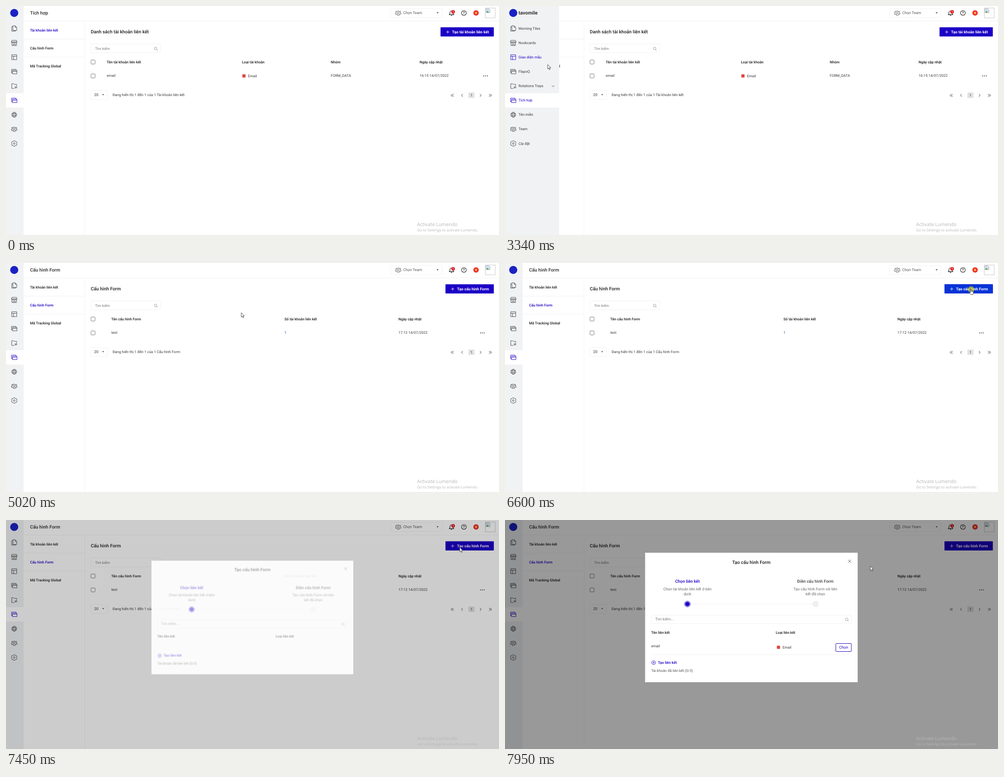
An HTML page for the animation above (8000 ms loop, 1096 by 511 pixels).

```html
<!DOCTYPE html>
<html lang="vi">
<head>
<meta charset="utf-8">
<title>Tích hợp</title>
<style>
html, body { margin: 0; width: 100%; height: 100%; overflow: hidden; background: #fff; }
svg { display: block; width: 100vw; height: 100vh; font-family: Roboto, "Open Sans", sans-serif; text-rendering: geometricPrecision; }
.mark { font-family: "Open Sans", "Noto Sans", sans-serif; }
</style>
</head>
<body>
<svg id="stage" viewBox="0 0 1096 511"></svg>
<script>
const LOOP = 8000, BLUE = '#1b00c5', DARK = '#1c1c1c', INK = '#3a3a3a', EDGE = '#f1f1f1';
const stage = document.getElementById('stage');

// ---- drawing helpers ----
const text = (x, y, str, fill = INK, weight = 400, size = 8, anchor = 'start') =>
  `<text x="${x}" y="${y + size * .34}" font-size="${size}" font-weight="${weight}" fill="${fill}" text-anchor="${anchor}">${str}</text>`;
const mid = (x, y, str, fill, weight, size) => text(x, y, str, fill, weight, size, 'middle');
const bold = (x, y, str, fill = DARK, size = 8) => text(x, y, str, fill, 500, size);
const rect = (x, y, w, h, fill, extra = '') => `<rect x="${x}" y="${y}" width="${w}" height="${h}" fill="${fill}" ${extra}/>`;
const frame = (x, y, w, h, color = EDGE, r = 1) => rect(x, y, w, h, 'none', `stroke="${color}" rx="${r}"`);
const circle = (x, y, r, fill, extra = '') => `<circle cx="${x}" cy="${y}" r="${r}" fill="${fill}" ${extra}/>`;
const line = (d, color = INK, w = 1) => `<path d="${d}" fill="none" stroke="${color}" stroke-width="${w}"/>`;
const at = (x, y, body, extra = '') => `<g transform="translate(${x} ${y}) ${extra}">${body}</g>`;
const fade = (alpha, body) => alpha > 0 ? `<g opacity="${alpha}">${body}</g>` : '';
const arrowDown = (x, y) => `<path d="M${x - 2.2},${y - 1.2}h4.4l-2.2,2.8z" fill="#555"/>`;
const lens = (x, y) => line(`M${x + 2.6},${y - .7}a3,3 0 1 0 -6,0a3,3 0 1 0 6,0M${x + 1.8},${y + 1.5}l2.4,2.5`, '#888', .8);
const dots = (x, y) => [-4, 0, 4].map(d => circle(x + d, y, 1, '#222')).join('');
const mail = (x, y) => rect(x - 3.5, y - 3.5, 7, 7, '#e0443a');

// ---- motion helpers ----
const ramp = (t, a, b) => Math.min(1, Math.max(0, (t - a) / (b - a)));
const ease = p => p * p * (3 - 2 * p);
const PATH = [
  [300, 1019, 495], [440, 860, 445], [650, 642, 371], [1379, 642, 371], [1380, 730, 405], [1590, 1074, 500],
  [2120, 907, 476], [2400, 500, 320], [2650, 140, 185], [2790, 20, 150], [2860, 40, 148],
  [3070, 95, 140], [3270, 95, 140], [3340, 95, 131], [3490, 96, 82], [3880, 103, 209], [4030, 103, 209],
  [4250, 126, 190], [4450, 141, 150], [4810, 100, 96], [4880, 100, 96], [5020, 522, 111],
  [5300, 800, 92], [5670, 1036, 58], [7300, 1036, 58], [7450, 1009, 61], [7950, 812, 103]
];
function cursorAt(t) {
  if (t < 300 || (t >= 1590 && t < 2120)) return null;
  const i = PATH.findIndex(k => k[0] > t);
  if (i < 0) return PATH[PATH.length - 1].slice(1);
  const [t0, x0, y0] = PATH[i - 1], [t1, x1, y1] = PATH[i], p = (t - t0) / (t1 - t0);
  return [x0 + (x1 - x0) * p, y0 + (y1 - y0) * p];
}

// ---- sidebar ----
const STACK = 'M-4,-2.5H6V5H-4ZM-4,-.3H6M-4,3H-6V-5H4V-2.5';
const TEAM = 'M-2,-2.8a2,2 0 1 0 4,0a2,2 0 1 0 -4,0M-2.6,5V1.5H2.6V5ZM-5.5,-3a1.1,1.1 0 1 0 2.2,0a1.1,1.1 0 1 0 -2.2,0' +
  'M3.3,-3a1.1,1.1 0 1 0 2.2,0a1.1,1.1 0 1 0 -2.2,0M-3.5,-.3H-6V3H-4M3.5,-.3H6V3H4';
const MENU = [
  ['Morning Tiles', 'M-3,-6H2L5.5,-2.5V4.5H-3ZM2,-6V-2.5H5.5M-3,-4H-5.5V6H3V4.5'],
  ['Nookcards', 'M-5,-5.5H5L6.3,-2H-6.3ZM-6.3,-2a2.1,2.1 0 0 0 4.2,0a2.1,2.1 0 0 0 4.2,0a2.1,2.1 0 0 0 4.2,0M-5,0V6H5V0M-2,6V2.5H2V6'],
  ['Giao diện mẫu', 'M-5.5,-5.5H5.5V5.5H-5.5ZM-5.5,-2H5.5M-1.5,-2V5.5'],
  ['FlapoQ', STACK],
  ['Rotations Trays', 'M5.5,-.5V-3.5H0L-1.5,-5H-5.5V5.5H0M1,2H6L4.5,.5M6.5,4H1.5L3,5.5'],
  ['Tích hợp', STACK],
  ['Tên miền', 'M-5.5,0a5.5,5.5 0 1 0 11,0a5.5,5.5 0 1 0 -11,0M-2.5,0a2.5,5.5 0 1 0 5,0a2.5,5.5 0 1 0 -5,0M-5,-2H5M-5,2H5'],
  ['Team', TEAM],
  ['Cài đặt', 'M-2,-5.8H2L3,-4.2H5L6,-1.5L5,0L6,1.5L5,4.2H3L2,5.8H-2L-3,4.2H-5L-6,1.5L-5,0L-6,-1.5L-5,-4.2H-3ZM-1.8,0a1.8,1.8 0 1 0 3.6,0a1.8,1.8 0 1 0 -3.6,0']
];
const ROW = 32.1, TOP = 34;

function sidebar(t, cur) {
  const open = ease(ramp(t, 2720, 2900)) - ease(ramp(t, 4260, 4420));
  const width = 39.5 + 81 * open;
  const hover = cur && open > 0 && cur[0] < width ? Math.floor((cur[1] - 3 - TOP) / ROW) : -1;
  const items = MENU.map(([label, icon], i) => {
    const y = TOP + ROW * (i + .5), color = i === 5 || i === hover ? BLUE : INK;
    return at(18.3, y, line(icon, color, .9)) +
      (open > 0 ? text(30, y, label, color) : '') +
      (open > 0 && i === 4 ? line(`M104,${y - 1}l3,2.6l3,-2.6`, color, .8) : '');
  }).join('');
  return `<clipPath id="side"><rect width="${width}" height="511"/></clipPath><g clip-path="url(#side)">` +
    rect(0, 0, width, 511, '#f1f2f4') + rect(0, TOP + 5 * ROW, width, ROW, '#fff') +
    circle(18.3, 15.5, 9, '#1a22c4') + (open > 0 ? text(30, 15.5, 'tavomile', '#333', 700, 11) : '') + items + '</g>';
}

// ---- page ----
const STAR = Array.from({ length: 10 }, (_, i) => {
  const r = i % 2 ? 1.4 : 3.4, a = i * Math.PI / 5;
  return [(r * Math.sin(a)).toFixed(2), (-r * Math.cos(a)).toFixed(2)];
}).join(' ');

const header = title =>
  bold(53.5, 15.5, title, '#2a2a2a', 10.28) + line('M40,33.5H1096', EDGE) +
  frame(855.5, 5.5, 114, 20) + at(872, 15.5, line(TEAM, '#555', .9)) + text(883, 15.3, 'Chọn Team', '#555', 400, 8.3) + arrowDown(959.5, 15.3) +
  at(990.5, 16, line('M-5,3.3H5L3.6,1.4V-1.2A3.6,3.8 0 0 0 -3.6,-1.2V1.4ZM-1.5,4.8H1.5', '#222', 1.2)) +
  circle(994, 13, 4, '#e3242b') + mid(994, 13, '1', '#fff', 500, 5.5) +
  circle(1018, 15.5, 5.3, 'none', 'stroke="#222" stroke-width="1.1"') + mid(1018, 15.5, '?', '#222', 700, 8) +
  circle(1045, 15.5, 6, '#f0302f') + at(1045, 15.5, `<polygon points="${STAR}" fill="#ffd84a"/>`) +
  frame(1065.5, 4.5, 22, 22, '#c8c8c8', 0) +
  at(1066.5, 5.5, '<path d="M.5,.5H7L9.5,3V9.5H.5Z" fill="#d4e2f7" stroke="#999" stroke-width=".7"/><path d="M1,9L4,5L7,9Z" fill="#55a548"/>');

const TABS = ['Tài khoản liên kết', 'Cấu hình Form', 'Mã Tracking Global'];
const tabs = (active, hover) =>
  line('M175.5,34V511M40,74H175M40,114H175', EDGE) +
  TABS.map((s, i) => bold(53.5, 54 + 40.3 * i, s, i === active || i === hover ? BLUE : DARK)).join('');

const box = y => frame(189, y - 4.5, 9, 9, '#777', 1.3);
const PAGES = [
  { title: 'Tích hợp', head: 'Danh sách tài khoản liên kết', add: 'Tạo tài khoản liên kết', left: 966, dots: 1066, unit: 'Tài khoản liên kết',
    body: bold(224, 125, 'Tên tài khoản liên kết') + bold(524.5, 125, 'Loại tài khoản') + bold(722, 125, 'Nhóm') + bold(919.5, 125, 'Ngày cập nhật') +
      text(224, 155.7, 'email') + mail(529, 156) + text(538, 156.2, 'Email') + text(722, 155.7, 'FORM_DATA') + text(919.5, 155.7, '16:15 14/07/2022') },
  { title: 'Cấu hình Form', head: 'Cấu hình Form', add: 'Tạo cấu hình Form', left: 977, dots: 1059, unit: 'Cấu hình Form',
    body: bold(234, 125, 'Tên cấu hình Form') + bold(619, 125, 'Số tài khoản liên kết') + bold(872.5, 125, 'Ngày cập nhật') +
      text(234, 155.7, 'test') + text(619, 155.7, '1', '#1a4fa0') + text(872.5, 155.7, '17:12 14/07/2022') }
];
const pager = line('M992,196.4l-2.6,3l2.6,3M995,196.4l-2.6,3l2.6,3M1015.2,196.4l-2.6,3l2.6,3' +
    'M1053.8,196.4l2.6,3l-2.6,3M1074,196.4l2.6,3l-2.6,3M1077,196.4l2.6,3l-2.6,3', '#333', 1) +
  rect(1028, 193, 13.5, 12.2, '#e2e2e2', 'rx="1"') + mid(1034.7, 199.2, '1', INK, 400, 8);

function page(t, hoverTab) {
  const n = t < 4880 ? 0 : 1, p = PAGES[n], w = 1084.5 - p.left;
  const lit = ramp(t, 5600, 5740) - ramp(t, 7250, 7350);
  return header(p.title) + tabs(n, hoverTab) + bold(188.5, 58, p.head, DARK, 10.28) +
    rect(p.left, 47.5, w, 20.5, BLUE, 'rx="1"') + fade(lit, rect(p.left, 47.5, w, 20.5, '#0733d6', 'rx="1"')) +
    line(`M${p.left + 12.5},58h7m-3.5,-3.5v7`, '#fff', .9) + text(p.left + 25.8, 57.7, p.add, '#fff', 700, 8.56) +
    frame(188.5, 84.5, 155, 20) + text(198, 94.8, 'Tìm kiếm', '#777') + lens(333, 95.5) +
    box(125) + box(156) + p.body + dots(p.dots, 156) +
    frame(188.5, 188.5, 37, 20) + text(196, 198.5, '20', INK, 400, 8.56) + arrowDown(216, 198) +
    text(237, 198.5, 'Đang hiển thị 1 đến 1 của 1 ' + p.unit) + pager;
}

// ---- dialog, laid out from its top edge at y = 73 ----
function dialog(t) {
  const p = ramp(t, 7370, 7570);
  if (!p) return '';
  const loaded = t >= 7700, cut = loaded ? 0 : 22, h = 289 - cut, scale = .915 + .085 * p;
  const row = loaded ? text(325, 280.8, 'email') + mail(608, 284) + text(617, 284, 'Email') +
    frame(735.5, 275.5, 34.5, 18, BLUE) + mid(752.7, 284.5, 'Chọn', BLUE, 400, 8.56) + line('M325,300.5H770', EDGE) : '';
  const content =
    mid(547.7, 94.5, 'Tạo cấu hình Form', DARK, 500, 10.28) + line('M762.5,88.5l7,7m0,-7l-7,7', '#555', .9) +
    mid(405.5, 137, 'Chọn liên kết', BLUE, 500, 9.4) + mid(690, 137, 'Điền cấu hình Form', '#444', 500, 9.4) +
    mid(405.5, 154, 'Chọn tài khoản liên kết ở bên', '#666', 400, 8.4) + mid(405.5, 165.3, 'dưới', '#666', 400, 8.4) +
    mid(690, 154, 'Tạo cấu hình Form với liên', '#666', 400, 8.4) + mid(690, 165.3, 'kết đã chọn', '#666', 400, 8.4) +
    line('M412,187.5H684', EDGE) + circle(405.5, 187.5, 6.5, '#fff', `stroke="${BLUE}" stroke-width=".9"`) +
    circle(405.5, 187.5, 5.1, BLUE) + circle(690.5, 187.5, 7, '#f0f0f0') +
    frame(325.5, 212.5, 445, 18.5) + text(334, 221.5, 'Tìm kiếm...', '#777', 400, 8.4) + lens(760, 222.3) +
    bold(325, 250.8, 'Tên liên kết') + bold(602, 250.8, 'Loại liên kết') + row +
    at(0, -cut, circle(330.5, 318.3, 4.1, 'none', `stroke="${BLUE}" stroke-width=".9"`) + line('M328.3,318.3h4.4m-2.2,-2.2v4.4', BLUE, .9) +
      bold(340, 318, 'Tạo liên kết', BLUE, 8.2) + text(325, 336.5, 'Tài khoản đã liên kết (0/3)', '#555', 400, 8));
  // the panel turns opaque well before its content
  const panel = fade(1 - (1 - p) ** 5, rect(311.5, 73, 472.5, h, '#fff'));
  return at(547.7, 217.5, panel + fade(p, content), `scale(${scale}) translate(-547.7 ${-73 - h / 2})`);
}

// ---- pointer ----
const ARROW = '<path d="M0,0V9.8L2.3,7.7L3.9,11.4L5.5,10.7L3.9,7.1H7Z" fill="#fff" stroke="#222" stroke-width=".8"/>';
const HAND = '<path d="M-1,1Q0,-.4 1,1V5L5,6Q5.8,6.3 5.5,8L4.5,12.5H-.5L-3.3,8.3Q-3.3,6.8 -1,8Z" fill="#fff" stroke="#222" stroke-width=".8"/>';

function pointer(t, cur) {
  if (!cur) return '';
  const [x, y] = cur, hand = t >= 5600 && t < 7300;
  const click = t >= 6600 && t < 6800 ? circle(x, y + 1, 7, '#e0e000', 'opacity=".6"') : '';
  return click + at(x, y, hand ? HAND : ARROW);
}

const watermark = '<g class="mark">' +
  text(914, 487.7, 'Activate Lumendo', '#b6b6b6', 400, 10.7) +
  text(914, 500.5, 'Go to Settings to activate Lumendo.', '#b6b6b6', 400, 8.2) + '</g>';

function draw(now) {
  const t = now % LOOP, cur = cursorAt(t);
  const hoverTab = t > 4420 && t < 4880 && cur[1] > 74 && cur[1] < 114 ? 1 : -1;
  stage.innerHTML = rect(0, 0, 1096, 511, '#fff') + page(t, hoverTab) + sidebar(t, cur) +
    fade(.4 * ramp(t, 7300, 7600), rect(0, 0, 1096, 511, '#000')) + dialog(t) + watermark + pointer(t, cur);
}

const start = performance.now();
function tick() {
  draw(performance.now() - start);
  requestAnimationFrame(tick);
}
tick();
</script>
</body>
</html>
```
